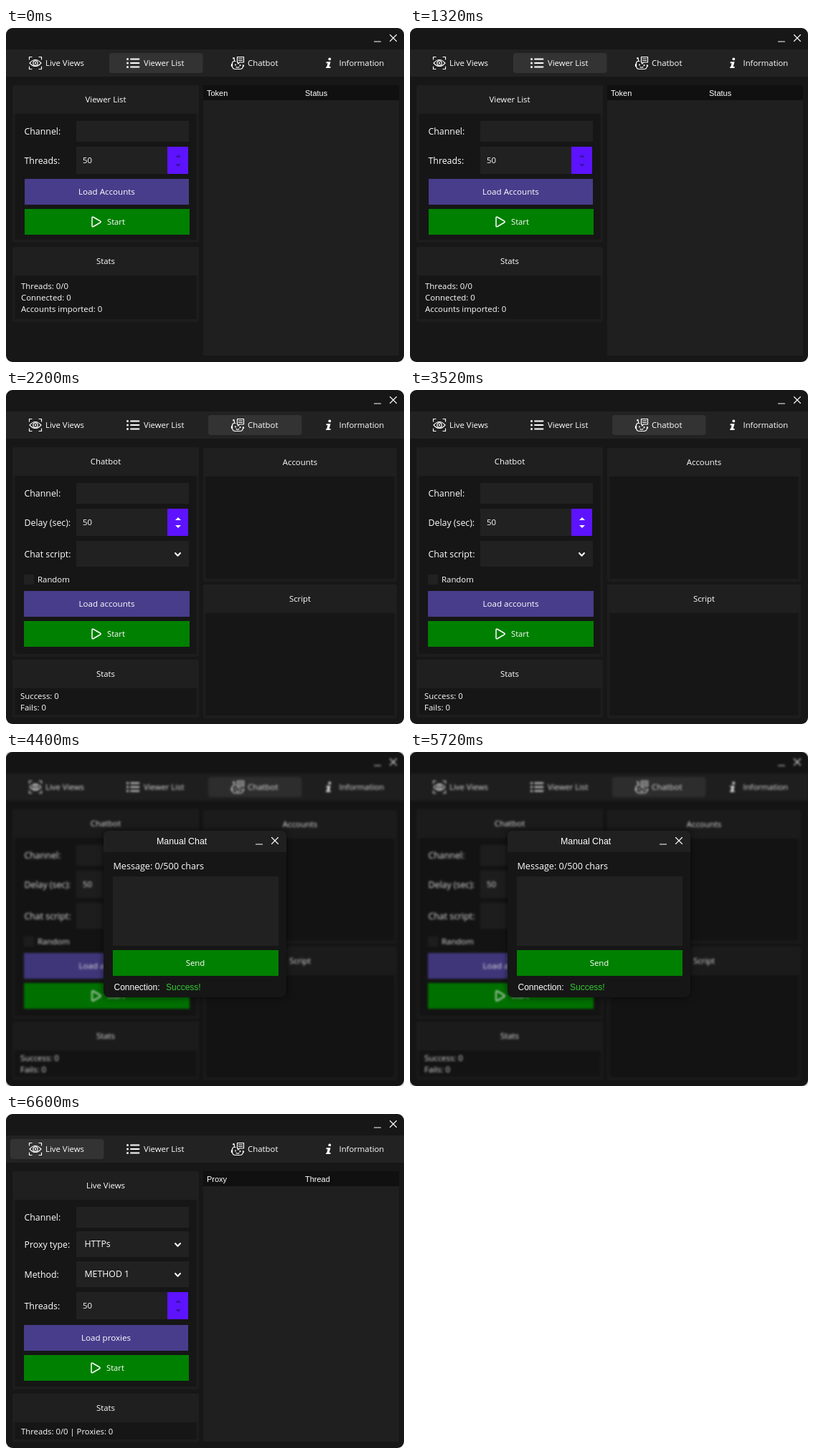
Recreate the animation shown at these times as an HTML page. Size 555x467 px, loop 8.8 s.

```html
<!DOCTYPE html>
<html lang="en">
<head>
<meta charset="utf-8">
<title>Viewer tool</title>
<style>
  html, body { margin: 0; width: 100%; height: 100%; overflow: hidden; background: #fff; }
  svg { display: block; width: 555px; height: 467px; }
  text { font-family: "Open Sans", "Noto Sans", sans-serif; fill: #fff; white-space: pre; }
  .arial { font-family: "Liberation Sans", Arial, sans-serif; }
  .line { fill: none; stroke: #fff; stroke-linecap: round; stroke-linejoin: round; }
  .blur { filter: blur(1.6px) brightness(.88); }
</style>
</head>
<body>
<svg id="stage" viewBox="0 0 555 467" width="555" height="467"></svg>
<script>
const STEP = 2200;
const BG = '#171717', PANEL = '#1d1d1d', INNER = '#161616', FIELD = '#212121';
const PURPLE = '#483d8b', GREEN = '#008000', SPIN = '#5d13ff';

// Basic shapes; rect takes left, top, right, bottom
const rect = (l, t, r, b, fill, rx = 0) =>
  `<rect x="${l}" y="${t}" width="${r - l}" height="${b - t}" rx="${rx}" fill="${fill}"/>`;
const text = (x, y, s, size = 11.4, extra = '') =>
  `<text x="${x}" y="${y}" font-size="${size}" ${extra}>${s}</text>`;
const mid = (x, y, s, size) => text(x, y, s, size, 'text-anchor="middle"');
const label = (y, s) => text(25.5, y, s, 12.35);
const arial = (x, y, s, size = 12, fill = '#fff') =>
  text(x, y, s, size, `class="arial" style="fill:${fill}"`);
const line = (d, w = 1.2, extra = '') =>
  `<path class="line" d="${d}" stroke-width="${w}" ${extra}/>`;

// Icons
const eyeIcon = line('M36 40.5H32.5V44M46 40.5H49.5V44M36 57.5H32.5V54M46 57.5H49.5V54') +
  line('M33 49Q41 40 49 49Q41 58 33 49Z') +
  '<circle class="line" cx="41" cy="49" r="3.2" stroke-width="1.2"/><circle cx="41" cy="49" r="1.2" fill="#fff"/>';
const listIcon = [43.5, 49, 54.5].map(y =>
  `<circle cx="169.5" cy="${y}" r="1.5" fill="#fff"/>` + line(`M174 ${y}H185.5`, 1.8)).join('');
const botIcon =
  line('M320 46.5H318Q315.5 46.5 315.5 49.5V53Q315.5 57.5 320 57.5H326Q330.5 57.5 330.5 53V51.5') +
  line('M318.5 46V43.5M314.5 50.5V53.5M331.5 52V53.5M321 54.5Q323 56 325 54.5') +
  line('M322.5 40.5H331.5V48H326L323.5 50V48H322.5Z') +
  line('M324.5 43H329.5M324.5 45.5H329.5', 1) +
  '<circle cx="317.5" cy="42.3" r="1.3" fill="#fff"/>' +
  '<circle cx="320" cy="51.5" r="1.1" fill="#fff"/><circle cx="326.5" cy="52.2" r="1.1" fill="#fff"/>';
const infoIcon = '<circle cx="451.3" cy="43.4" r="1.9" fill="#fff"/>' +
  '<path d="M446.8 47.3H452.6L450.7 54H452.8L452.4 56H446L446.5 54.2H447.3L448.6 49.2H446.4Z" fill="#fff"/>';
const chevron = y => line(`M236 ${y - 2}L239.5 ${y + 1.8}L243 ${y - 2}`, 2);
const winButtons = (x, y) =>
  line(`M${x - 26.5} ${y + 5}H${x - 17.5}`) +
  line(`M${x - 4.5} ${y - 4.5}L${x + 4.5} ${y + 4.5}M${x + 4.5} ${y - 4.5}L${x - 4.5} ${y + 4.5}`, 1.1);

// Controls
const field = (t, b) => rect(98, t, 255, b, FIELD);
const select = (t, s = '') =>
  field(t, t + 36) + text(109.5, t + 22, s, 12.3) + chevron(t + 19);
function spinner(t, on) {
  const c = t + 19, g = on ? 3 : 4, fill = on ? '#fff' : '#3b12a8';
  return rect(98, t, 254, t + 38, FIELD) + rect(225, t, 254, t + 38, SPIN) +
    `<path d="M236 ${c - g}h8l-4-4zM236 ${c + g + 1}h8l-4 4z" fill="${fill}"/>` +
    text(107, t + 23, '50', 11.4);
}
const loadButton = (l, t, r, s) => rect(l, t, r, t + 36, PURPLE) + mid((l + r) / 2, t + 22, s, 11.6);
const startButton = (l, t, r, x) => rect(l, t, r, t + 36, GREEN) +
  line(`M${x - 6} ${t + 12.5}Q${x - 6} ${t + 10.5} ${x - 4} ${t + 11.5}L${x + 5.5} ${t + 17}Q${x + 7} ${t + 18} ${x + 5.5} ${t + 19}L${x - 4} ${t + 24.5}Q${x - 6} ${t + 25.5} ${x - 6} ${t + 23.5}Z`, 1.5) +
  text(x + 15, t + 22, 'Start', 11.2);
const panel = (l, t, r, b, s) =>
  rect(l, t, r, b, PANEL, 3) + rect(l, t, r, t + 40, '#1f1f1f', 3) +
  rect(l + 3.5, t + 40, r - 3.5, b - 4, INNER) + mid((l + r) / 2, t + 24, s);
const table = (a, b) =>
  rect(275, 80, 548, 458, '#1f1f1f') + rect(275, 80, 548, 101, '#101010') +
  arial(280, 95, a, 11) + arial(417, 95, b, 11);

function shell(tab) {
  const x = [6, 144, 282][tab];
  return rect(0, 0, 555, 467, BG, 9) + winButtons(540, 14) +
    rect(0, 30, 555, 68, '#222') + rect(x, 35, x + 130.5, 63, '#333', 4) +
    eyeIcon + listIcon + botIcon + infoIcon +
    text(55, 53, 'Live Views') + text(192, 53, 'Viewer List', 11.3) +
    text(337, 53, 'Chatbot') + text(464.5, 53, 'Information', 11.3);
}

const viewerList = shell(1) +
  panel(9, 80, 269, 300, 'Viewer List') +
  label(149, 'Channel:') + field(130, 159) +
  label(190, 'Threads:') + spinner(166, false) +
  loadButton(26, 211, 255, 'Load Accounts') + startButton(26, 253, 256, 126) +
  panel(9, 306, 269, 411, 'Stats') +
  text(21, 365, 'Threads: 0/0') + text(21, 381, 'Connected: 0') +
  text(21, 397, 'Accounts imported: 0') +
  table('Token', 'Status');

const chatbot = shell(2) +
  panel(9, 80, 269, 373, 'Chatbot') +
  label(149, 'Channel:') + field(130, 159) +
  label(190, 'Delay (sec):') + spinner(166, true) +
  label(234, 'Chat script:') + select(211) +
  rect(25, 258, 39, 272, FIELD) + text(44, 269, 'Random') +
  loadButton(25, 281, 256, 'Load accounts') + startButton(25, 323, 256, 126) +
  panel(9, 377, 269, 458, 'Stats') +
  text(20, 432, 'Success: 0') + text(20, 448, 'Fails: 0') +
  panel(275, 81, 545, 268, 'Accounts') + panel(275, 272, 545, 459, 'Script');

const dialog = '<g style="filter:drop-shadow(0 0 5px rgba(0,0,0,.6))">' +
  rect(136, 110, 391, 343, INNER, 8) + '</g>' +
  '<path d="M136 140V118Q136 110 144 110H383Q391 110 391 118V140Z" fill="#202020"/>' +
  arial(210, 129, 'Manual Chat', 12.4) + winButtons(375, 124) +
  text(149.5, 164, 'Message: 0/500 chars', 12.6) +
  rect(149, 174, 380, 271, FIELD) +
  rect(149, 277, 380, 313, GREEN) + mid(264, 299, 'Send') +
  arial(150.5, 333, 'Connection:') + arial(223, 333, 'Success!', 12, '#32cd32');

const manualChat = rect(0, 0, 555, 467, '#141414', 9) +
  `<g class="blur">${chatbot}</g>` + dialog;

const liveViews = shell(0) +
  panel(9, 80, 269, 385, 'Live Views') +
  label(149, 'Channel:') + field(130, 159) +
  label(187, 'Proxy type:') + select(164, 'HTTPs') +
  label(229, 'Method:') + select(206, 'METHOD 1') +
  label(273, 'Threads:') + spinner(249, false) +
  loadButton(25, 295, 254, 'Load proxies') + startButton(25, 337, 255, 125) +
  panel(9, 391, 269, 459, 'Stats') +
  text(21, 448, 'Threads: 0/0 | Proxies: 0', 11.3) +
  table('Proxy', 'Thread');

const stage = document.getElementById('stage');
const views = [viewerList, chatbot, manualChat, liveViews];
stage.innerHTML = views.map((v, i) => `<g display="${i ? 'none' : 'inline'}">${v}</g>`).join('');
const layers = [...stage.children];
const start = performance.now();

function draw() {
  const now = Math.floor((performance.now() - start) / STEP) % layers.length;
  layers.forEach((g, i) => g.setAttribute('display', i === now ? 'inline' : 'none'));
  requestAnimationFrame(draw);
}
draw();
</script>
</body>
</html>
```
